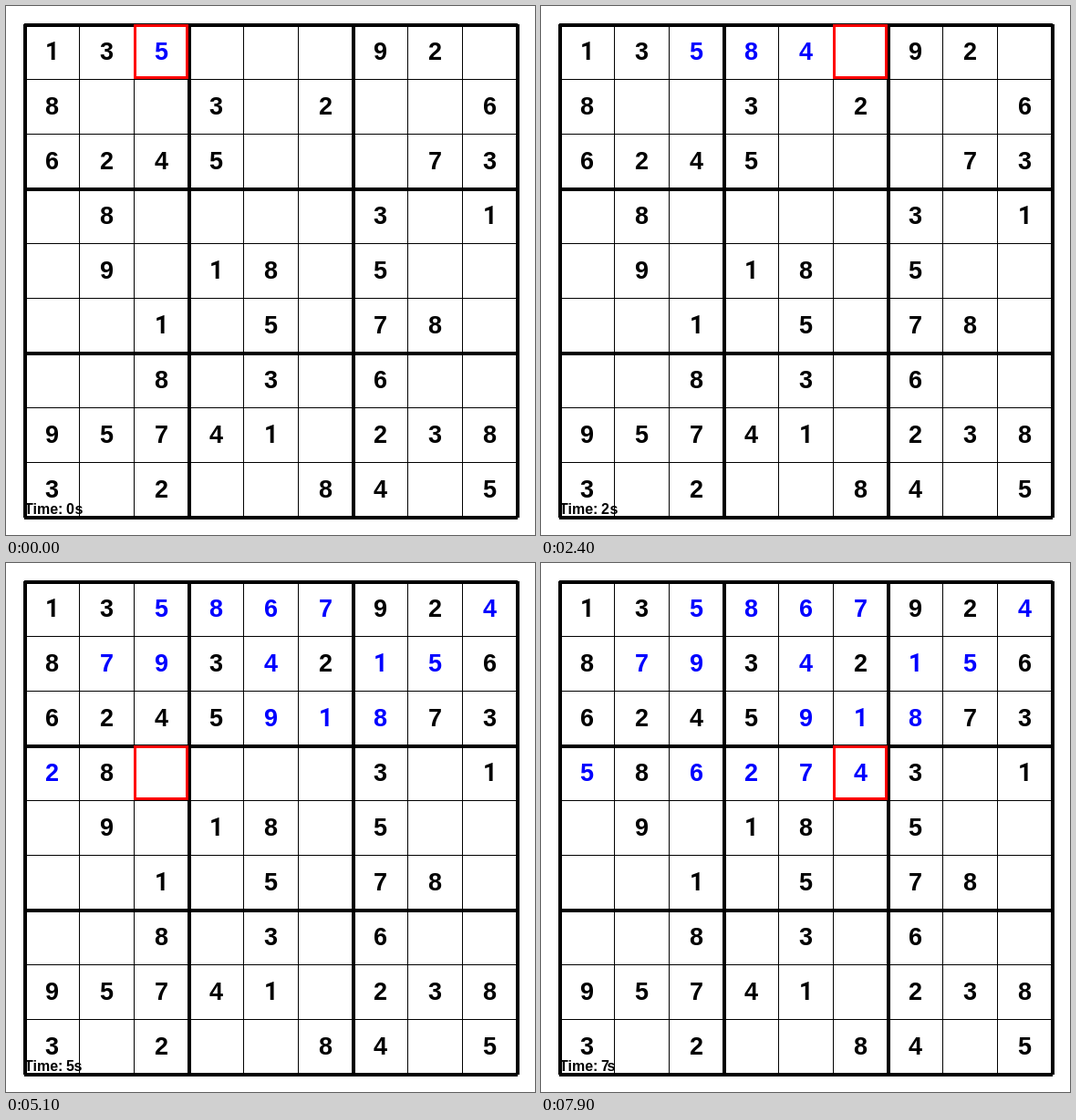
An HTML page with a canvas for the animation above (8000 ms loop, 580 by 580 pixels).

```html
<!DOCTYPE html>
<html lang="en">
<head>
<meta charset="utf-8">
<title>Sudoku backtracking</title>
<style>
html, body { margin: 0; width: 100%; height: 100%; overflow: hidden; background: #fff; }
canvas { display: block; }
</style>
</head>
<body>
<canvas id="stage" width="580" height="580"></canvas>
<script>
const ctx = document.getElementById('stage').getContext('2d');
const CELL = 60, EDGE = 20, STEP = 100, STEPS = 80;
const puzzle = [
  '130000920', '800302006', '624500073',
  '080000301', '090180500', '001050780',
  '008030600', '957410238', '302008405'
].join('').split('').map(Number);

function fits(grid, pos, n) {
  const row = Math.floor(pos / 9), col = pos % 9;
  const top = row - row % 3, left = col - col % 3;
  for (let i = 0; i < 9; i++) {
    const boxPos = (top + Math.floor(i / 3)) * 9 + left + i % 3;
    if ([row * 9 + i, i * 9 + col, boxPos].some(p => grid[p] === n)) return false;
  }
  return true;
}

// Yields a snapshot after every placed or erased digit.
function* solve(grid) {
  const pos = grid.indexOf(0);
  if (pos < 0) return true;
  for (let n = 1; n <= 9; n++) {
    if (!fits(grid, pos, n)) continue;
    grid[pos] = n;
    yield { grid: grid.slice(), pos };
    if (yield* solve(grid)) return true;
    grid[pos] = 0;
    yield { grid: grid.slice(), pos };
  }
  return false;
}

const solver = solve(puzzle.slice());
const steps = Array.from({ length: STEPS }, () => solver.next().value);

function text(str, x, y, size) {
  // Roboto has a "1" without a foot.
  const family = str === '1' ? 'Roboto' : '"Liberation Sans"';
  ctx.font = `bold ${size}px ${family}, Arial, sans-serif`;
  ctx.fillText(str, x, y);
}

function drawLines() {
  ctx.fillStyle = '#000';
  for (let i = 0; i <= 9; i++) {
    const thick = i % 3 === 0;
    const at = EDGE + i * CELL - (thick ? 1 : 0), width = thick ? 4 : 1;
    ctx.fillRect(EDGE, at, 9 * CELL + 1, width);
    ctx.fillRect(at, EDGE, width, 9 * CELL + 1);
  }
}

function drawTime(seconds) {
  const kern = { 1: -1, 5: -1, 7: -3 }[seconds] || 0;
  ctx.fillStyle = '#000';
  text('Time:', 20, 557, 16);
  text(String(seconds), 66, 557, 16);
  text('s', 75.5 + kern, 557, 16);
}

function draw(time) {
  const step = Math.floor(time / STEP) % STEPS;
  const { grid, pos } = steps[step];
  ctx.fillStyle = '#fff';
  ctx.fillRect(0, 0, 580, 580);
  drawLines();
  grid.forEach((n, p) => {
    if (!n) return;
    ctx.fillStyle = puzzle[p] ? '#000' : '#00f';
    text(String(n), EDGE + p % 9 * CELL + 23, EDGE + Math.floor(p / 9) * CELL + 39, 27);
  });
  ctx.strokeStyle = '#f00';
  ctx.lineWidth = 3;
  ctx.strokeRect(EDGE + pos % 9 * CELL + 1.5, EDGE + Math.floor(pos / 9) * CELL + 1.5, CELL - 3, CELL - 3);
  drawTime(Math.floor(step * STEP / 1000));
}

const start = performance.now();
function tick() {
  draw(performance.now() - start);
  requestAnimationFrame(tick);
}
tick();
</script>
</body>
</html>
```
